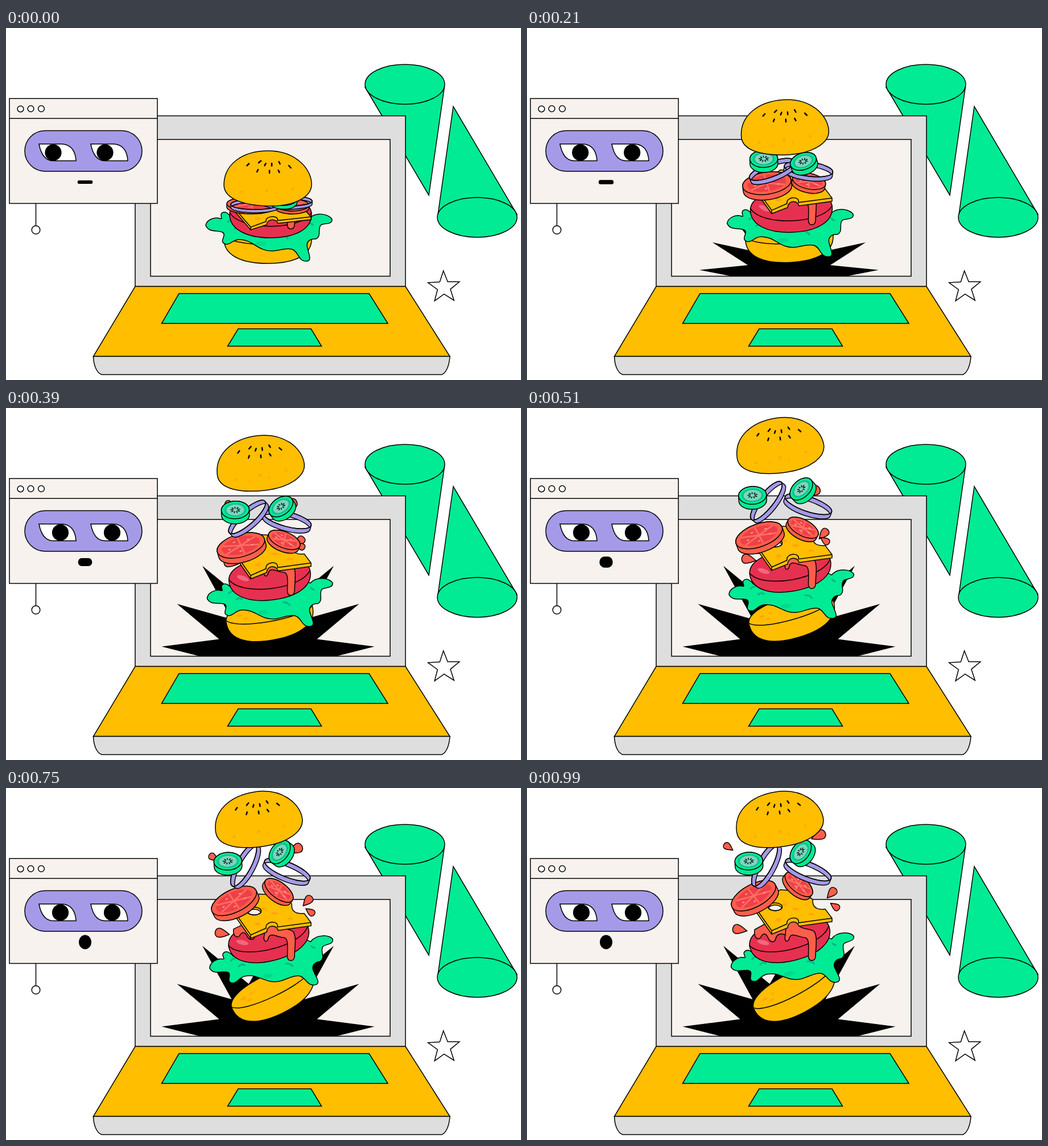
An HTML page that plays this animation: 905x619 px, repeating every 2.7 s.

```html
<!DOCTYPE html>
<html lang="en">
<head>
<meta charset="utf-8">
<title>Burger popping out of a laptop</title>
<style>
html, body { margin: 0; width: 100%; height: 100%; overflow: hidden; background: #fff; }
svg { display: block; width: 100vw; height: 100vh; }
svg * { vector-effect: non-scaling-stroke; }
.ink { stroke: #000; stroke-width: 1.5; }
.line { fill: none; stroke: #000; stroke-width: 1.5; }
.green { fill: #00eb93; }
.gold { fill: #ffbe00; }
.cream { fill: #f7f2ed; }
.grey { fill: #dedede; }
.purple { fill: #a49ae8; }
.red { fill: #ff5e4b; }
.spot { fill: #ff9f12; opacity: .75; }
.vein { fill: none; stroke: #00b889; stroke-width: 3; stroke-linecap: round; }
.seed { stroke: #000; stroke-width: 2.5; stroke-linecap: round; }
</style>
</head>
<body>
<svg viewBox="0 0 905 619" preserveAspectRatio="none">
  <g class="ink green">
    <path d="M631 104L743 294L770.500 103Z"/>
    <ellipse cx="701" cy="99" rx="70" ry="35"/>
    <path d="M759 328L786 138L898 328Z"/>
    <ellipse cx="828" cy="333" rx="70" ry="35"/>
  </g>
  <path id="star" class="ink" fill="#fff"/>

  <g class="ink">
    <rect class="grey" x="227" y="154.500" width="475" height="300"/>
    <rect class="cream" x="254" y="196" width="421" height="240.500"/>
    <path class="gold" d="M227 454.500H702L780 577.500H153.500Z"/>
    <path class="grey" d="M153.500 577.500H780C779 593 774 606 766 609.500H168C159 606 154 593 153.500 577.500Z"/>
    <path class="green" d="M304 467H638L671 519.500H273.500ZM408 529H536L554.500 559.500H389.500Z"/>
  </g>

  <g class="ink">
    <rect class="cream" x="6" y="124" width="260" height="184.500"/>
    <path class="line" d="M6 159H266M52.500 308.500V348"/>
    <g fill="#fff">
      <circle cx="25.500" cy="142.300" r="5.400"/><circle cx="43.500" cy="142" r="5.400"/><circle cx="62" cy="142" r="5.400"/>
      <circle cx="52.500" cy="355" r="7.300"/>
    </g>
    <rect class="purple" x="33" y="180.500" width="206" height="71.500" rx="35.700"/>
    <path fill="#fff" d="M58 204H97C113 204 122 215 123 233.500H83C68 233.500 61 220 58 204ZM149 204H188C204 204 213 215 214 233.500H174C159 233.500 152 220 149 204Z"/>
  </g>
  <g id="pupils"><circle r="14.600"/><circle cx="91" r="14.600"/></g>
  <rect id="mouth"/>

  <path id="burst"/>

  <g id="base">
    <path class="ink gold" d="M-77 0C-79 32 -46 46 0 46C46 46 79 32 77 0C77 -16 50 -27 0 -27C-50 -27 -77 -16 -77 0Z"/>
    <path class="line" d="M-77 -3C-60 18 55 18 77 0"/>
    <g class="spot">
      <ellipse cx="-52" cy="-7" rx="5" ry="2"/><ellipse cx="-42" cy="0" rx="4" ry="1.800"/><ellipse cx="-35" cy="-9" rx="3" ry="1.500"/>
    </g>
  </g>

  <g id="lettuce">
    <path class="ink green" d="M-109 -3C-107 -14 -92 -18 -84 -15C-77 -12 -86 -22 -80 -25C-74 -29 -67 -22 -64 -16C-30 -36 50 -36 74 -16C86 -28 110 -22 113 -13C113 -4 100 -7 94 -4C86 2 96 16 84 21C74 20 66 26 70 38C73 50 78 60 67 60C53 60 54 42 42 39C30 36 20 42 6 42C-18 42 -26 22 -50 22C-62 22 -66 32 -74 30C-88 26 -70 14 -80 9C-90 5 -104 10 -109 -3Z"/>
    <path class="vein" d="M-70 -9Q-66 -13 -60 -12M24 14Q31 14 35 20M74 -8Q76 -5 79 -4M-58 3Q-53 -1 -48 3"/>
    <ellipse cx="-12" cy="29" rx="10" ry="4" fill="#00db90"/>
  </g>

  <g id="patty">
    <path class="ink" fill="#e6304f" d="M-72 -2C-72 24 -42 39 0 39C42 39 72 24 72 -2C72 -25 40 -35 0 -35C-40 -35 -72 -25 -72 -2Z"/>
    <path class="line" d="M-72 -6C-55 27 55 27 72 -6"/>
    <ellipse cx="-47" cy="-5" rx="11" ry="4" transform="rotate(28 -47 -5)" fill="#f2677d"/>
  </g>

  <g id="sauce">
    <g id="spill"><path class="ink red" transform="translate(0 -240)" d="M400 249C398 266 408 268 411 262C415 254 420 256 423 262C426 271 435 274 437 265C439 256 448 254 458 261L470 236L420 238Z"/></g>
    <path class="ink red" d="M454 258C451 271 459 273 461 264C464 252 478 263 488 263C497 264 494.500 280 494.500 296C494 306 507 306 507 296C507 283 511 262 505 253C500 246 480 250 478 240L470 228L456 232Z"/>
  </g>

  <g id="cheese">
    <g transform="translate(-430 -257)">
      <path class="ink gold" d="M404 214L445 179L478 181L501 195C504 197 500 200 504 207C509 214 517 214 524 213L536 229V235L478 243C476 233 459 232 458 246L430 257L404 220Z"/>
      <path class="line" d="M404 214L430 251L457 239C454 227 480 224 477 237L536 229M430 251V257"/>
      <g class="spot">
        <ellipse cx="452" cy="205" rx="5" ry="2.500"/><ellipse cx="472" cy="213" rx="6" ry="2.500"/><ellipse cx="499" cy="222" rx="5" ry="2"/><ellipse cx="442" cy="232" rx="5" ry="3"/>
      </g>
      <ellipse class="ink gold" cx="436" cy="209" rx="12.500" ry="7"/>
      <path class="ink cream" d="M424 211C430 204 443 204 448 211C443 217 430 217 424 211Z"/>
    </g>
  </g>

  <g id="drops"></g>
  <g id="tomatoL"></g>
  <g id="tomatoR"></g>
  <g id="onionR"></g>
  <g id="onionL"></g>
  <g id="cucumberL"></g>
  <g id="cucumberR"></g>

  <g id="bun">
    <path class="ink gold" d="M-77 11C-77 -25 -45 -49 1 -49C48 -49 77 -18 77 10C77 33 45 48 6 48C-40 48 -77 36 -77 11Z"/>
    <path class="seed" d="M-36.500 -23l3.500 -3.500M-16 -28l4 -3.500M-5.500 -23l2 -4M7 -22.500v-4.500M21.500 -26l-2 -4M40.500 -19l-3.500 -4M-19 -12l2 -4M3 -10v-4.500M20.500 -11l-2 -4"/>
    <g class="spot">
      <circle cx="-46" cy="23" r="2.300"/><circle cx="-2" cy="21" r="2.600"/><circle cx="-23" cy="28" r="1.200"/><circle cx="13" cy="27" r="1.600"/><circle cx="44" cy="18" r="2.200"/>
    </g>
  </g>
</svg>

<script>
const LOOP = 2700, STEP = 30, TAU = Math.PI * 2;
const $ = id => document.getElementById(id);
const mix = (a, b, k) => a + (b - a) * k;

// Easing
const sineOut = u => Math.sin(u * TAU / 4);
const smooth = u => u * u * (3 - 2 * u);
const drift = u => 1 - (1 - u) ** 1.4;
const phase = (start, end, ease) => t =>
  ease(Math.min(1, Math.max(0, (t - start) / (end - start))));

const pop = phase(45, 630, sineOut);
const toss = phase(45, 780, sineOut);
const lift = phase(30, 990, sineOut);
const heave = phase(30, 770, smooth);
const tilt = phase(30, 890, smooth);
const open = phase(30, 270, sineOut);
const blast = phase(30, 330, smooth);
const glance = phase(40, 300, sineOut);
const gasp = phase(90, 750, smooth);
const pour = phase(450, 840, smooth);
const splash = phase(270, 990, drift);
const bead = phase(270, 390, sineOut);

// Drawing helpers
const oval = (rx, ry, attrs) => `<ellipse rx="${rx}" ry="${ry}" ${attrs}/>`;
const side = (rx, ry, thick) =>
  `M${-rx} 0A${rx} ${ry} 0 0 1 ${rx} 0V${thick}A${rx} ${ry} 0 0 1 ${-rx} ${thick}Z`;
const spokes = (n, draw) => Array.from({ length: n }, (_, i) => {
  const a = .45 + i * TAU / n;
  return draw(Math.cos(a), Math.sin(a));
}).join('');

const disc = (rx, ry, thick, cls, inside) => `<g transform="translate(0 ${-thick / 2})">
  <path class="ink ${cls}" d="${side(rx, ry, thick)}"/>
  ${oval(rx, ry, `class="ink ${cls}"`)}${inside}</g>`;

const tomato = (rx, ry, thick) => disc(rx, ry, thick, 'red',
  oval(rx * .8, ry * .76, 'fill="#ef4049"') +
  spokes(6, (c, s) => `<path d="M0 0L${rx * .8 * c} ${ry * .76 * s}" stroke="#ff7263" stroke-width="2.5"/>`) +
  spokes(5, (c, s) => oval(2.4, 1.1, `fill="#ff9a94" transform="translate(${rx * .5 * c} ${ry * .48 * s})"`)));

const cucumber = (rx, ry, thick) => disc(rx, ry, thick, 'green',
  oval(rx * .78, ry * .76, 'fill="#12bd91"') + oval(rx * .64, ry * .62, 'fill="#7ad6bd"') +
  spokes(9, (c, s) => `<path class="ink" d="M${rx * c * .16} ${ry * s * .16}L${rx * c * .36} ${ry * s * .36}"/>`));

// A short tube: its hole is where the upper and lower rims overlap
function onion(rx, ry, thick) {
  const x = rx * Math.sqrt(1 - (thick / 2 / ry) ** 2), y = thick / 2;
  const hole = `M${-x} ${y}A${rx} ${ry} 0 0 1 ${x} ${y}A${rx} ${ry} 0 0 1 ${-x} ${y}Z`;
  return `<g transform="translate(0 ${-y})">
    <path class="ink purple" fill-rule="evenodd" d="${side(rx, ry, thick)}${hole}"/>
    ${oval(rx, ry, 'class="line"')}</g>`;
}

function starPath(cx, cy, r) {
  let d = '';
  for (let i = 0; i < 10; i++) {
    const a = i * TAU / 10 - TAU / 4 - .03, k = i % 2 ? r * .41 : r;
    d += `${i ? 'L' : 'M'}${cx + k * Math.cos(a)} ${cy + k * Math.sin(a)}`;
  }
  return d + 'Z';
}

// Right half of the burst, mirrored to the left
function burstPath() {
  const half = [[0, -150], [34, -92], [115.5, -159], [64, -65], [160, -92], [86, -30], [187, -17], [120, 0]];
  const left = half.slice(1).reverse().map(([x, y]) => [-x, y]);
  return `M${[...half, ...left].join('L')}Z`;
}

$('star').setAttribute('d', starPath(769.5, 456, 29));
$('burst').setAttribute('d', burstPath());
$('tomatoL').innerHTML = tomato(43, 20, 10);
$('tomatoR').innerHTML = tomato(29.5, 14, 7);
$('onionL').innerHTML = onion(42, 13, 8);
$('onionR').innerHTML = onion(43, 13, 8);
$('cucumberL').innerHTML = cucumber(24.5, 15.5, 9);
$('cucumberR').innerHTML = cucumber(23.5, 15, 9);

// Motion: each pose is [x, y, turn]; flat is the height a squeezed part opens from
const updates = [];
const place = (el, [x, y, turn = 0], sx = 1, sy = 1) =>
  el.setAttribute('transform', `translate(${x} ${y}) rotate(${turn}) scale(${sx} ${sy})`);
const between = (from, to, k) => from.map((v, i) => mix(v, to[i], k));

function move(id, timing, from, to, flat = 1) {
  updates.push(t => place($(id), between(from, to, timing(t)), 1, mix(flat, 1, open(t))));
}

move('bun', pop, [460, 265, 0], [443, 55.5, -9]);
move('base', tilt, [460, 368, 0], [467, 353, -28]);
move('lettuce', tilt, [460, 350, 0], [466, 296, -11.5]);
move('patty', heave, [465, 330, 0], [462, 265, -14]);
move('sauce', heave, [0, 50], [0, 0]);
move('cheese', lift, [430, 355], [430, 257], .82);
move('tomatoL', lift, [431, 312, 0], [400.5, 194, -28], .6);
move('tomatoR', lift, [503, 314, 0], [475.5, 172, 40], .75);
move('onionL', toss, [437, 313, 0], [421, 137, -62], .7);
move('onionR', toss, [495, 307, 0], [493, 147, 22], .7);
move('cucumberL', toss, [430, 288, 0], [390, 133, -3], .7);
move('cucumberR', toss, [488, 304, 0], [484.5, 115, -52], .75);
move('pupils', glance, [83, 219], [95.5, 219]);

function addDrop(from, to, turn, size) {
  const g = document.createElementNS('http://www.w3.org/2000/svg', 'g');
  g.innerHTML = '<path class="ink red" d="M-11 0C-4 -4 0 -7 5 -7C13 -7 13 7 5 7C0 7 -4 4 -11 0Z"/>';
  $('drops').append(g);
  updates.push(t => {
    const [x, y] = between(from, to, splash(t)), s = size * bead(t);
    place(g, [x, y, turn], s, s);
  });
}
addDrop([405, 190], [354, 104], 215, .85);
addDrop([495, 195], [512, 84], -25, 1.2);
addDrop([510, 250], [535, 185], -48, 1);
addDrop([510, 252], [541, 208], 35, .82);
addDrop([402, 279], [374, 249], 190, 1.15);

updates.push(t => {
  const k = blast(t), p = pour(t), g = gasp(t);
  place($('burst'), [460.5, 436.5], mix(.55, 1, k), k);
  place($('spill'), [0, 240], 1, p);
  const w = mix(26.5, 22, g), h = mix(6, 25, g);
  const box = { x: 139 - w / 2, y: 271 - h / 2, width: w, height: h, rx: mix(2.5, 11, g), ry: mix(2.5, 12.5, g) };
  for (const key in box) $('mouth').setAttribute(key, box[key]);
});

const start = performance.now();
function draw(now) {
  const t = Math.max(0, now - start) % LOOP;
  const stepped = Math.floor(t / STEP) * STEP;
  updates.forEach(update => update(stepped));
  requestAnimationFrame(draw);
}
draw(start);
</script>
</body>
</html>
```
